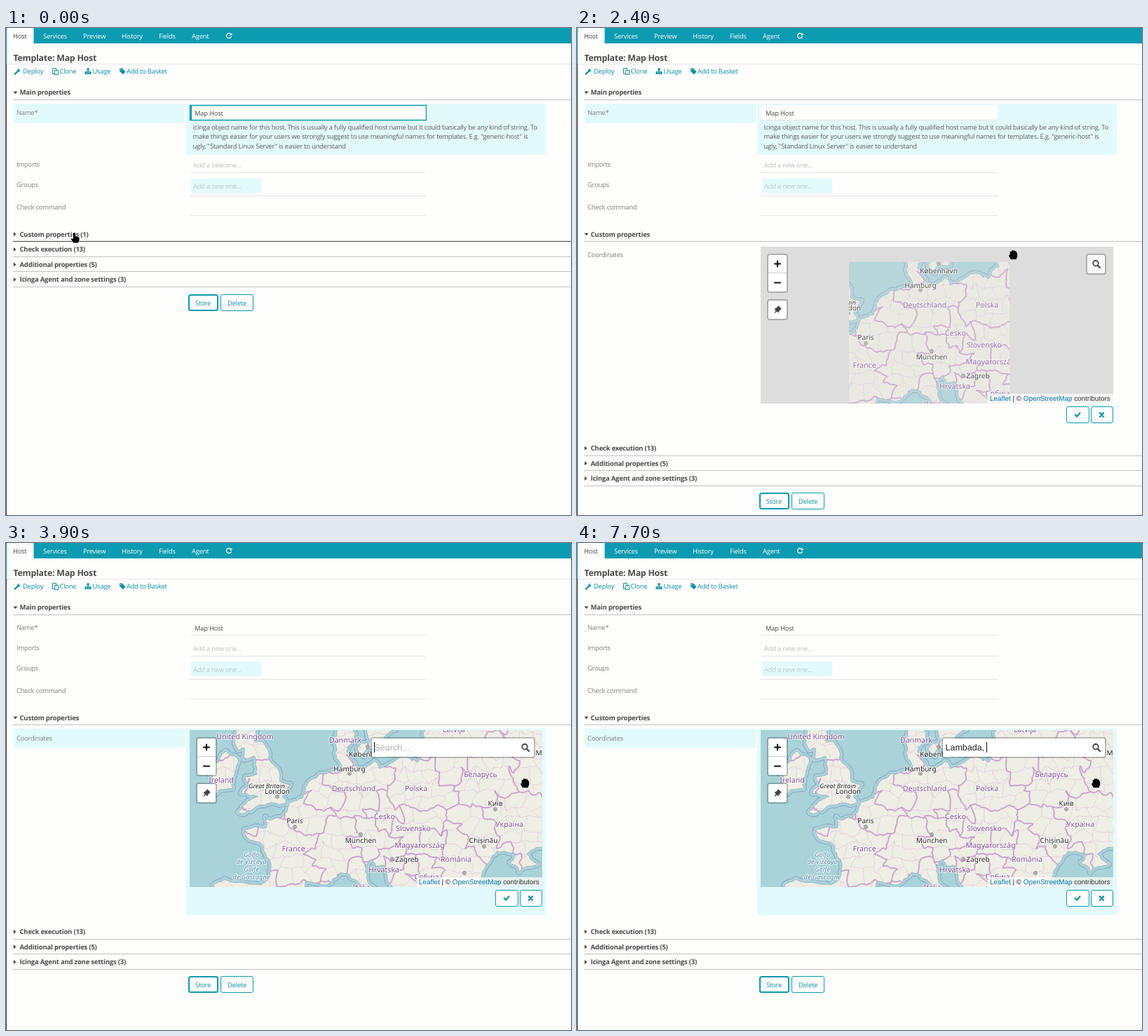
These frames come from a looping animation (806x695 px, 8 s). An HTML page with a canvas:

```html
<!DOCTYPE html>
<html lang="en">
<head>
<meta charset="utf-8">
<title>Template: Map Host</title>
<style>
html, body { margin: 0; width: 100%; height: 100%; overflow: hidden; background: #fefefd; }
canvas { display: block; }
</style>
</head>
<body>
<canvas id="stage" width="806" height="695"></canvas>
<script>
const TEAL = '#0c9bb1', LINK = '#0b8fa5', INK = '#4a4a4a', SOFT = '#7f7f7f';
const TINT = '#e3fafb', PAPER = '#fefefd', RULE = '#c2c2c2', FAINT = '#e4e4e4';
const UI = '"Open Sans", sans-serif', MAPFONT = '"Noto Sans", sans-serif', ARIAL = '"Liberation Sans", Arial, sans-serif';
const BODY = '9.4px ' + UI, BOLD = 'bold 9.5px ' + UI, TITLE = 'bold 12.3px ' + UI, FIELD = '12.5px ' + ARIAL;
const stage = document.getElementById('stage').getContext('2d');
let g = stage;

// ---------- drawing helpers ----------
function text(s, x, y, color = INK, font = BODY, align = 'left') {
  g.font = font; g.fillStyle = color; g.textAlign = align;
  g.textRendering = 'geometricPrecision';
  g.letterSpacing = font.endsWith(UI) ? '-0.21px' : '0px';
  g.fillText(s, x, Math.round(y));
}
function rect(x, y, w, h, color) { g.fillStyle = color; g.fillRect(x, y, w, h); }
function rule(y, color = RULE, x0 = 10, x1 = 806) { rect(x0, Math.floor(y), x1 - x0, 1, color); }
function box(x, y, w, h, r, fill, line, width = 1) {
  g.beginPath();
  g.roundRect(x, y, w, h, r);
  if (fill) { g.fillStyle = fill; g.fill(); }
  if (line) { g.strokeStyle = line; g.lineWidth = width; g.stroke(); }
}
function shape(d, x, y, fill, line, width = 1) {
  const p = new Path2D(d);
  g.save();
  g.translate(x, y);
  g.lineJoin = g.lineCap = 'round';
  if (line) { g.strokeStyle = line; g.lineWidth = width; g.stroke(p); }
  if (fill) { g.fillStyle = fill; g.fill(p); }
  g.restore();
}
function ring(x, y, r, line, width = 1, fill) {
  g.beginPath(); g.arc(x, y, r, 0, 7);
  if (fill) { g.fillStyle = fill; g.fill(); }
  g.strokeStyle = line; g.lineWidth = width; g.stroke();
}

// ---------- map: coasts from a few key points (longitude, latitude), the rest is seeded ----------
const coasts = [
  '-6,57.8 -6,56.5 -5.6,55.4 -4.8,55.6 -5,54.7 -3.3,54.9 -3,53.4 -4.6,53.2 -4.1,52.5 -5.2,51.8 -2.8,51.5 -4.4,51 ' +
  '-5.6,50.1 -3.6,50.3 -2.9,50.7 1.2,51 .6,51.5 1.7,52.6 .2,52.9 .1,53.7 -1.4,54.8 -2.1,56 -3.3,56 -2,57.8',
  '-6.1,53.5 -6.4,52.2 -9.8,51.5 -9.2,53.1 -10,54.2 -8.4,54.4 -7.3,55.3 -5.6,54.6',
  '-9.2,40 -9.1,43.1 -7.5,43.7 -1.8,43.4 -1.1,45.5 -2.2,47.1 -4.5,47.9 -4.7,48.5 -1.6,48.7 -1.8,49.7 -1.1,49.4 .2,49.6 ' +
  '1.6,50.9 3.5,51.4 4.8,53 7.1,53.6 8.9,53.9 8.2,55.6 8.3,57 10.5,57.6 10.8,56.4 9.6,55.3 11,54 13.5,54.5 14.2,53.9 ' +
  '18.3,54.8 19.6,54.4 21.1,55.4 21.3,58 21,62 45,62 45,47.3 38,47.1 34.9,46.2 36.5,45.2 35.2,45 33.9,44.4 32.6,45.4 ' +
  '33.4,46.1 30.8,46.5 28.7,44.2 27.8,40 19,40 15.3,43.9 14.8,45.1 13.7,44.9 13.2,45.7 12.3,45.1 12.5,44.2 14.2,42 ' +
  '13,40 10.3,43.8 8.8,44.4 6.5,43.1 3.9,43.5 3,40',
  '11.9,58 12.8,55.5 14.2,55.5 16.5,57 16.8,58',
  '11.1,55.6 12.5,56 12.1,54.9 11.2,55.2'];
const countries = [['United Kingdom', 341, 321], ['Ireland', 307, 383], ['Danmark', 484, 326], ['Deutschland', 496, 395], ['Polska', 585, 395],
  ['Lietuva', 636, 343], ['Latvija', 639, 311], ['Беларусь', 677, 375], ['Україна', 718, 446], ['Česko', 540, 435], ['Slovensko', 581, 452],
  ['Magyarország', 590, 476], ['România', 642, 496], ['Hrvatska', 539, 511], ['Србија', 600, 521], ['Italia', 507, 536], ['France', 410, 481]];
// countries that show no label
const unnamed = [[372, 391], [443, 405], [435, 428], [470, 478], [530, 472], [536, 492], [568, 518], [678, 470], [765, 360], [375, 560]];
const cities = [['London', 387, 399, 387, 407], ['Paris', 412, 441, 412, 450], ['München', 506, 469, 506, 461], ['Hamburg', 490, 367, 490, 374],
  ['København', 516, 346, 516, 336], ['Zagreb', 572, 496, 551, 496], ['Київ', 698, 416, 698, 425], ['Chișinău', 681, 469, 682, 478],
  ['', 0, 0, 654, 516], ['Москва', 774, 344, 790, 352]];

let seed = 7;
const rand = () => (seed = seed * 16807 % 2147483647) / 2147483647;

function project(pair) {
  const [lon, lat] = pair.split(',').map(Number);
  return [388.15 + 10.15 * lon, 1018.9 - 581.6 * Math.asinh(Math.tan(lat * Math.PI / 180))];
}
function rough(points, depth) {
  if (!depth) return points;
  const out = [points[0]];
  for (let i = 1; i < points.length; i++) {
    const [ax, ay] = points[i - 1], [bx, by] = points[i], k = (rand() - .5) * .34;
    out.push([(ax + bx) / 2 + (ay - by) * k, (ay + by) / 2 + (bx - ax) * k], points[i]);
  }
  return rough(out, depth - 1);
}
function trace(path, points) {
  points.forEach(([x, y], i) => i ? path.lineTo(x, y) : path.moveTo(x, y));
}
function stroke(path, color, width) {
  g.strokeStyle = color; g.lineWidth = width; g.stroke(path);
}
function label(s, x, y, color, font) {
  g.font = font; g.textAlign = 'center';
  g.textRendering = 'geometricPrecision';
  g.strokeStyle = 'rgba(255,255,255,.65)'; g.lineWidth = 2.2;
  g.strokeText(s, x, Math.round(y + 3.7));
  text(s, x, y + 3.7, color, font, 'center');
}

// A jittered honeycomb of districts; an edge is a border where its two cells lie nearest to different countries.
function divisions() {
  const centres = [...countries.map(c => c.slice(1)), ...unnamed];
  const node = (c, r) => {
    const h = Math.sin(c * 127.1 + r * 311.7) * 43758.5, f = h - Math.floor(h);
    return [250 + c * 12 + 6 * Math.sin(f * 40), 296 + r * 18 + 6 * Math.cos(f * 57)];
  };
  const owner = (c, r) => {
    const mid = c + ((r + c) % 2 ? 1 : 0), x = 250 + mid * 12, y = 305 + r * 18;
    const far = centres.map(([cx, cy]) => Math.hypot(cx - x, cy - y));
    return far.indexOf(Math.min(...far));
  };
  const districts = new Path2D(), borders = new Path2D();
  const edge = (a, b, one, two) => trace(one === two ? districts : borders, rough([a, b], 2));
  for (let r = 0; r < 15; r++) for (let c = 0; c < 45; c++) {
    edge(node(c, r), node(c + 1, r), owner(c, r), owner(c, r - 1));
    if ((r + c) % 2) edge(node(c, r), node(c, r + 1), owner(c, r), owner(c - 1, r));
  }
  return { districts, borders };
}
function paintMap() {
  const canvas = document.createElement('canvas');
  canvas.width = 503; canvas.height = 224;
  g = canvas.getContext('2d');
  g.translate(-262, -312);
  g.lineJoin = 'round';
  rect(262, 312, 503, 224, '#a9d3d8');
  const land = new Path2D();
  for (const coast of coasts) {
    const p = coast.split(' ').map(project);
    trace(land, rough([...p, p[0]], 3));
    land.closePath();
  }
  stroke(land, '#8d9fc6', 9);
  stroke(land, '#a9d3d8', 7.2);
  g.fillStyle = '#eeeee5';
  g.fill(land);
  stroke(land, '#86a9b8', .7);
  g.save();
  g.clip(land);
  const { districts, borders } = divisions();
  stroke(districts, 'rgba(214,165,212,.5)', .8);
  stroke(borders, 'rgba(206,160,208,.45)', 2.6);
  stroke(borders, '#c08fc4', 1);
  g.restore();
  ['Golfo', 'de Vizcaya', 'Golfe', 'de Gascogne'].forEach((s, i) =>
    label(s, 350, 489 + i * 10.7, '#5f93ae', 'italic 9.3px ' + MAPFONT));
  for (const [s, x, y] of countries) label(s, x, y, '#815294', '10.6px ' + MAPFONT);
  label('Great Britain', 372, 391, '#222', 'italic 9px ' + MAPFONT);
  for (const [s, x, y, mx, my] of cities) {
    ring(mx, my, 2.3, '#555', .9, '#fff');
    rect(mx - .7, my - .7, 1.4, 1.4, '#333');
    label(s, x, y, '#2a2a2a', '10.1px ' + MAPFONT);
  }
  g = stage;
  return canvas;
}
const mapPicture = paintMap();

// ---------- icons ----------
const check = 'M-3.2 0L-1 2.4L3.4 -2.6', cross = 'M-2.6 -2.6L2.6 2.6M2.6 -2.6L-2.6 2.6';
const pointer = 'M-1.6 1Q0 -1 1.6 1V5.2L4 5.6L7 7V11L5.6 14.5H-1.5L-4.6 9.6Q-4.4 7.4 -1.6 9Z';
const grab = 'M-4.4 1V-3.2Q-3.2 -5 -2.2 -3.4V-5Q-1 -7 .3 -5Q1.6 -6.6 2.7 -4.4Q4.4 -5.4 5 -3.2L6.2 -1V3L4.6 7.2H-3L-6 2.6Q-6.2 .2 -4.4 1Z';
function magnifier(x, y) {
  ring(x - 1, y - 1.2, 3.8, '#444', 1.8);
  shape('M2 2L5 5', x, y, null, '#444', 2.2);
}
function globe(x, y, color) {
  ring(x, y, 3.6, color, 1);
  shape('M-3 -1.6L0 -3.4L1.4 -1.6L-.4 .6L-2.4 .4ZM1 .4L3.2 0L1.8 2.6L.6 2Z', x, y, color);
}
function toolIcons() {
  shape('M0 8.2L4.6 3.8', 12.6, 57.6, null, LINK, 2.2);
  shape('M4 3Q4.6 0 7.4 .4L6 2L7 3L8.4 1.8Q8.6 5 5.4 5Z', 12, 57.4, LINK);
  box(66.5, 57.5, 5, 8, 0, null, LINK);
  box(69.5, 60.5, 5, 6, 0, PAPER, LINK);
  shape('M0 5V3H7V5M3.5 0V5', 113.5, 59, null, LINK, 1);
  rect(115.4, 57.4, 3.2, 3, LINK);
  for (const x of [112.4, 115.6, 118.8]) rect(x, 63, 2.7, 3, LINK);
  shape('M0 0H3.8L8.4 4.8L4.8 8.6L0 4Z', 162, 57.6, LINK);
  ring(163.8, 59.4, .5, PAPER, .8);
}

// ---------- page parts ----------
function header() {
  rect(0, 0, 806, 695, PAPER);
  rect(0, 51, 1, 644, '#3c3c3c');
  rect(0, 0, 806, 22, TEAL);
  rect(0, 22, 1, 29, TEAL);
  rect(1, 0, 38.5, 22, PAPER);
  text('Host', 10, 14.5);
  [['Services', 53], ['Preview', 110], ['History', 165], ['Fields', 218], ['Agent', 265]].forEach(([s, x]) => text(s, x, 14.5, '#fff'));
  shape('M3.2 -1.6A3.5 3.5 0 1 0 3.2 1.6', 318, 11, null, '#fff', 1.3);
  shape('M4.4 -3.8V-.4H1Z', 318, 11, '#fff');
  text('Template: Map Host', 10.5, 46.7, INK, TITLE);
  rule(51, '#e6e6e6', 1);
  [['Deploy', 24], ['Clone', 76.5], ['Usage', 123.5], ['Add to Basket', 172]].forEach(([s, x]) => text(s, x, 65.4, LINK));
  toolIcons();
  section('Main properties', 92, true);
}
function section(title, y, open, line = RULE) {
  shape(open ? 'M0 -1.5H6L3 2Z' : 'M.5 -3L4 0L.5 3Z', 10.4, y, '#444');
  text(title, 19.5, y + 3.4, INK, BOLD);
  rule(y + 10.4, line);
}
function fieldName(t) {
  if (t < 3900) {
    rect(11, 108, 244.5, 28, TINT);
    rect(257, 108, 513, 73, TINT);
    rect(262, 110, 338, 22, PAPER);
    ['Icinga object name for this host. This is usually a fully qualified host name but it could basically be any kind of string. To',
     'make things easier for your users we strongly suggest to use meaningful names for templates. E.g. "generic-host" is',
     'ugly, "Standard Linux Server" is easier to understand'].forEach((s, i) => text(s, 266.5, 145 + i * 13.4, '#5a5a5a'));
  }
  rule(131, FAINT, 262, 600);
  if (t < 800) {
    box(262.5, 110.5, 337, 21, 0, PAPER, TEAL, 1.3);
    rect(262, 110, 3, 22, TEAL);
    if (t >= 100) rect(269, 115, 1, 13, '#333');
  }
  text('Name*', 15, 124.3, SOFT);
  text('Map Host', 269, 125);
}
function fields() {
  [['Imports', 197.7], ['Groups', 226.5], ['Check command', 259.4]].forEach(([s, y]) => text(s, 15, y, SOFT));
  box(264, 214.5, 100, 21, 3, TINT);
  text('Add a new one...', 267, 198.6, '#bcbebe');
  text('Add a new one...', 267, 229, '#b3c8c9');
  for (const y of [206, 239, 267]) rule(y, FAINT, 262, 600);
}
function button(x, y, w, h, line = 1) {
  const inset = line / 2;
  box(x + inset, y + inset, w - line, h - line, 2.5, PAPER, TEAL, line);
}
function rest(y) {
  ['Check execution (13)', 'Additional properties (5)', 'Icinga Agent and zone settings (3)'].forEach((s, i) => section(s, y + i * 21.6));
  const top = Math.floor(y + 64.1);
  button(260, top, 43, 24, 2);
  button(306, top, 47, 24);
  text('Store', 281, top + 15.5, LINK, BODY, 'center');
  text('Delete', 329.6, top + 15.5, LINK, BODY, 'center');
}
function control(x, y, w, h) {
  box(x - 1, y - 1, w + 2, h + 2, 4, 'rgba(0,0,0,.22)');
  box(x + 1, y + 1, w - 2, h - 2, 2, '#fff');
}
function mapTiles(t) {
  const fade = start => Math.min(1, Math.max(0, (t - start) / 200));
  rect(262, 312, 503, 224, '#ddd');
  g.globalAlpha = fade(2400);
  g.drawImage(mapPicture, 262, 312);
  g.globalAlpha = fade(2250);
  if (t < 2600) g.drawImage(mapPicture, 126, 22, 229, 202, 388, 334, 229, 202);
  g.globalAlpha = 1;
}
function searchBox(t) {
  control(521, 323, 233, 28);
  const keys = [5000, 5400, 5600, 5800, 6000, 6200, 6600, 7400, 7700];
  const typed = 'Lambada, '.slice(0, keys.filter(k => t >= k).length);
  text(typed || 'Search...', 525.5, 341, typed ? '#222' : '#b0b0b0', FIELD);
  const hidden = t >= 4400 && t < 5000 || t >= 7200 && t < 7400;
  if (!hidden) rect(Math.round(525 + g.measureText(typed).width), 329, 1, 15, '#111');
}
function mapPanel(t) {
  if (t >= 3900) {
    rect(11, 309.5, 244.5, 27.5, TINT);
    rect(257, 309.5, 513, 266.5, TINT);
  }
  mapTiles(t);
  control(272, 323, 28, 54);
  rect(273, 349, 26, 1, '#ccc');
  shape('M-4 0H4M0 -4V4', 286, 336.5, null, '#111', 2.2);
  shape('M-4 0H4', 286, 363.5, null, '#111', 2.2);
  control(272, 388, 28, 28);
  shape('M1 -6L6 -1L4.6 -.4L2 2.4L1.4 4.6L-1 2.4L-5 6L-2.4 1L-4.6 -1.4L-2.4 -2L.4 -4.6Z', 286, 402, '#444');
  t < 3900 ? control(727, 323, 27, 28) : searchBox(t);
  magnifier(741, 337);
  rect(586, 522, 179, 14, 'rgba(255,255,255,.7)');
  let x = 589;
  for (const [s, color] of [['Leaflet', '#0078a8'], [' | © ', '#333'], ['OpenStreetMap', '#0078a8'], [' contributors', '#333']]) {
    text(s, x, 532.3, color, '9.9px ' + ARIAL);
    x += g.measureText(s).width;
  }
  button(698, 540, 33, 24);
  button(733, 540, 32, 24);
  shape(check, 714, 552, null, LINK, 2.2);
  shape(cross, 748.5, 552, null, LINK, 2.2);
}
function coordinates(t) {
  if (t >= 2200) mapPanel(t);
  else {
    const over = t >= 1900;
    rule(334.5, FAINT, 264, 600);
    box(603.5, 312.5, 30, 23, 2.5, over ? TEAL : PAPER, TEAL);
    globe(617.5, 324, over ? '#fff' : LINK);
  }
  text('Coordinates', 15, 326.5, SOFT);
}

// each move: start, end, x, y
const moves = [[1100, 1600, 590, 308], [1700, 2000, 622, 323], [2800, 3400, 741.5, 337], [3800, 3900, 740, 342]];
function hand(t) {
  let x = 97.5, y = 292;
  for (const [start, end, toX, toY] of moves) {
    const k = Math.min(1, Math.max(0, (t - start) / (end - start))), ease = 1 - (1 - k) ** 1.7;
    x += (toX - x) * ease;
    y += (toY - y) * ease;
  }
  const open = t >= 2200 && t < 3300 || t >= 3900;
  shape(open ? grab : pointer, x, y, '#000', 'rgba(255,255,255,.8)', 1.2);
}

function draw(t) {
  header();
  fieldName(t);
  g.save();
  if (t >= 3900) g.translate(0, -45);
  fields();
  const open = t >= 800;
  section(open ? 'Custom properties' : 'Custom properties (1)', 294.3, open, t < 1600 ? '#444' : RULE);
  if (open) coordinates(t);
  rest(t >= 2200 ? 599.7 : open ? 371.1 : 315.9);
  g.restore();
  hand(t);
}
function tick() {
  draw(Math.floor(performance.now() % 8000 / 100) * 100);
  requestAnimationFrame(tick);
}
tick();
</script>
</body>
</html>
```
